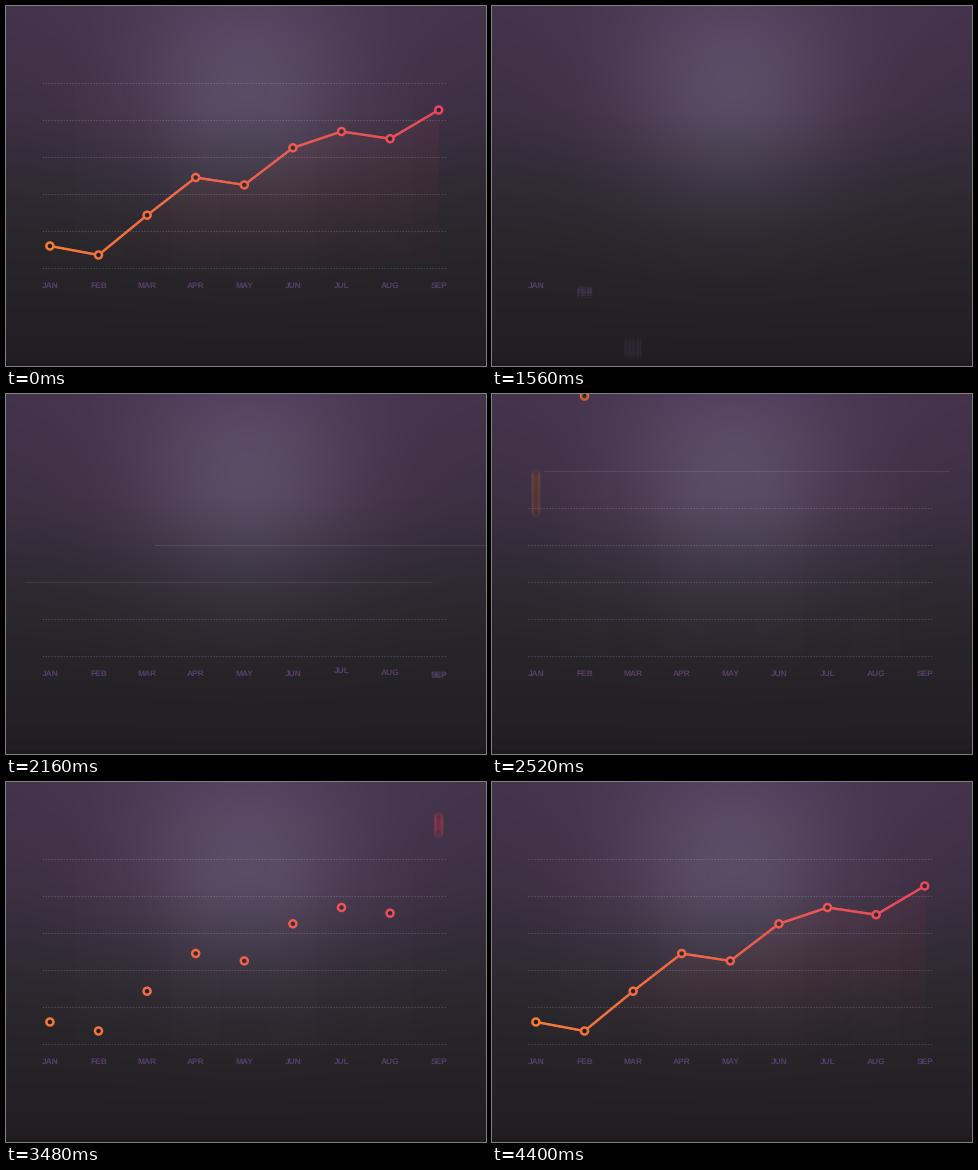
Animation of 480 by 360 pixels, one loop 7440 ms. Source, as a matplotlib script:

```python
import numpy as np
import matplotlib.pyplot as plt
from matplotlib.animation import FuncAnimation
from matplotlib.collections import LineCollection
from matplotlib.patches import Circle

W, H, DPI = 480, 360, 100
STEP, LOOP = 40, 7440
PX = 72 / DPI
plt.rcParams["text.hinting"] = "none"

MONTHS = "JAN FEB MAR APR MAY JUN JUL AUG SEP".split()
PITCH = 48.6
XS = 43.9 + PITCH * np.arange(9)
YS = np.array([240, 249, 209.2, 171.5, 178.9, 141.8, 125.5, 132.7, 104])
GRID_Y = 261.5 - 37 * np.arange(6)
GRID_X = np.array([35.5, 441])
ORANGE, RED = np.array([0.955, 0.48, 0.22]), np.array([0.91, 0.28, 0.37])

# Label offset from rest and dot fall progress, one key per step
LABEL_KEYS = [100, 72, 38, 10, 2.5, 0.5, 0, -1.5, -2.5, -1.5, 0]
DOT_KEYS = [0, 0.03, 0.135, 0.33, 0.68, 1.025, 0.992, 0.988, 1]
SAMPLES = 20


def warm(x):
    u = np.clip((np.asarray(x) - XS[0]) / (XS[-1] - XS[0]), 0, 1)
    return ORANGE + u[..., None] * (RED - ORANGE)


def keyed(keys, ms):
    """Catmull-Rom curve through the keys."""
    k = np.pad(np.array(keys, float), (1, 2), mode="edge")
    u = np.clip(np.asarray(ms) / STEP, 0, len(keys) - 1)
    i = np.floor(u).astype(int)
    f = u - i
    a, b, c, d = k[i], k[i + 1], k[i + 2], k[i + 3]
    return b + f / 2 * (c - a + f * (2 * a - 5 * b + 4 * c - d
                                     + f * (3 * (b - c) + d - a)))


def blurred(path, ms):
    """Positions swept while the shutter is open for half a step."""
    span = np.ptp(path(ms + np.array([0, 10, 20])))
    n = int(np.clip(np.ceil(span / 1.2), 1, SAMPLES))
    if n == 1:
        return [float(path(ms + 10))], 1.0
    return path(ms + np.linspace(0, 20, n)), min(1.0, 1.5 / n)


def backdrop():
    y, x = np.mgrid[0:H, 0:W]
    stops = [0, 100, 140, 180, 220, 270, 360]
    dist2 = (x - 240) ** 2 + (y - 85) ** 2

    def channel(levels, lift, size):
        return np.interp(y, stops, levels) + lift * np.exp(-dist2 / size ** 2)

    rgb = np.dstack([channel([67, 61, 54, 47, 42, 38, 32], 28, 124),
                     channel([52, 48, 45, 42, 39, 36, 30], 28, 110),
                     channel([76, 67, 59, 51, 45, 40, 33], 33, 117)])
    rgb[355:] -= [1, 4, 3]
    return rgb / 255


def area_image():
    y, x = np.mgrid[0:H, 0:W] + 0.5
    inside = (y > np.interp(x, XS, YS)) & (y < 261) & (x > XS[0]) & (x < XS[-1])
    alpha = 0.065 * np.sqrt(np.clip((261 - y) / 157, 0, 1)) * inside
    return np.dstack([warm(x), alpha])


def column_image():
    y, x = np.mgrid[0:H, 0:W] + 0.5
    odd = np.floor((x - XS[0]) / PITCH + 0.5) % 2 == 1
    inside = odd & (x > 68) & (x < 409) & (y > 77) & (y < 261)
    return np.dstack([np.ones((H, W, 3)), 0.009 * inside])


fig = plt.figure(figsize=(W / DPI, H / DPI), dpi=DPI)
ax = fig.add_axes([0, 0, 1, 1])
EXTENT = (0, W, H, 0)
bg = backdrop()


def layer(img, z):
    return ax.imshow(img, extent=EXTENT, interpolation="nearest",
                     aspect="auto", zorder=z)


layer(bg, 0)
columns = layer(column_image(), 1)
area = layer(area_image(), 1.5)
ax.set_xlim(0, W)
ax.set_ylim(H, 0)
ax.axis("off")

dotted, streaks = [], []
for gy in GRID_Y:
    dotted.append(ax.plot(GRID_X, [gy, gy], color="white", alpha=0.17, lw=PX,
                          ls=(0, (1.5, 1.5)), dash_capstyle="butt", zorder=2)[0])
    streaks.append(ax.plot(GRID_X, [gy, gy], color="white", alpha=0.085, lw=PX,
                           zorder=2)[0])

labels = [[ax.text(x, 0, m, ha="center", va="baseline", color="#573f69",
                   family="Liberation Sans", weight="bold", size=8.4 * PX, zorder=3)
           for _ in range(SAMPLES)] for x, m in zip(XS, MONTHS)]

# Trend line in short pieces so that the colour can run along it
cuts = np.unique(np.concatenate([np.linspace(XS[0], XS[-1], 150), XS]))
points = np.column_stack([cuts, np.interp(cuts, XS, YS)])
pieces = np.stack([points[:-1], points[1:]], axis=1)
trend = LineCollection(pieces, colors=warm(cuts[:-1]), linewidths=2.4 * PX,
                       capstyle="round", zorder=4)
ax.add_collection(trend)

dots = []
for x, y in zip(XS, YS):
    core = bg[int(y), int(x)] * 0.8
    dots.append([ax.add_patch(Circle((x, y), 3.5, facecolor=core, edgecolor=warm(x),
                                     lw=2.5 * PX, zorder=5))
                 for _ in range(SAMPLES)])


def show_copies(copies, places, alpha, move):
    for k, art in enumerate(copies):
        art.set_visible(k < len(places))
        if k < len(places):
            move(art, places[k])
            art.set_alpha(alpha)


def draw_grid(t):
    for i in range(6):
        n = (t - 1720 - 120 * i) / STEP
        side = 1 if i % 2 else -1
        off = 421 * 0.52 ** n if 0 <= n < 8 else 0
        moving = off > 4
        dotted[i].set_visible(n >= 0 and not moving)
        streaks[i].set_visible(n >= 0 and moving)
        streaks[i].set_xdata(GRID_X + side * off)


def draw_labels(t):
    for i, copies in enumerate(labels):
        ms = t - 1360 - 80 * i
        places, alpha = [], 1
        if ms >= 0:
            places, alpha = blurred(lambda s: 281.5 + keyed(LABEL_KEYS, s), ms)
        show_copies(copies, places, alpha, lambda art, y: art.set_y(y))


def draw_dots(t):
    for i, copies in enumerate(dots):
        ms = t - 2400 - 120 * i
        places, alpha = [], 1
        if ms >= 0:
            places, alpha = blurred(lambda s: YS[i] * keyed(DOT_KEYS, s), ms)
        show_copies(copies, places, alpha,
                    lambda art, y: art.set_center((XS[i], y)))


def draw_trend(t):
    p = np.clip((t - 3960) / 440, 0, 1)
    p = p * p * (3 - 2 * p)
    trend.set_segments(pieces[:int(round(p * len(pieces)))])
    trend.set_visible(p > 0)
    area.set_visible(p > 0)
    area.set_alpha(p)


def update(frame):
    t = frame * STEP
    if t < 1000:
        t = LOOP
    fade = np.clip((t - 2120) / 360, 0, 1)
    columns.set_visible(fade > 0)
    columns.set_alpha(fade)
    draw_grid(t)
    draw_labels(t)
    draw_dots(t)
    draw_trend(t)
    return []


anim = FuncAnimation(fig, update, frames=LOOP // STEP, interval=STEP,
                     repeat=True, repeat_delay=0, blit=False)
plt.show()
```
